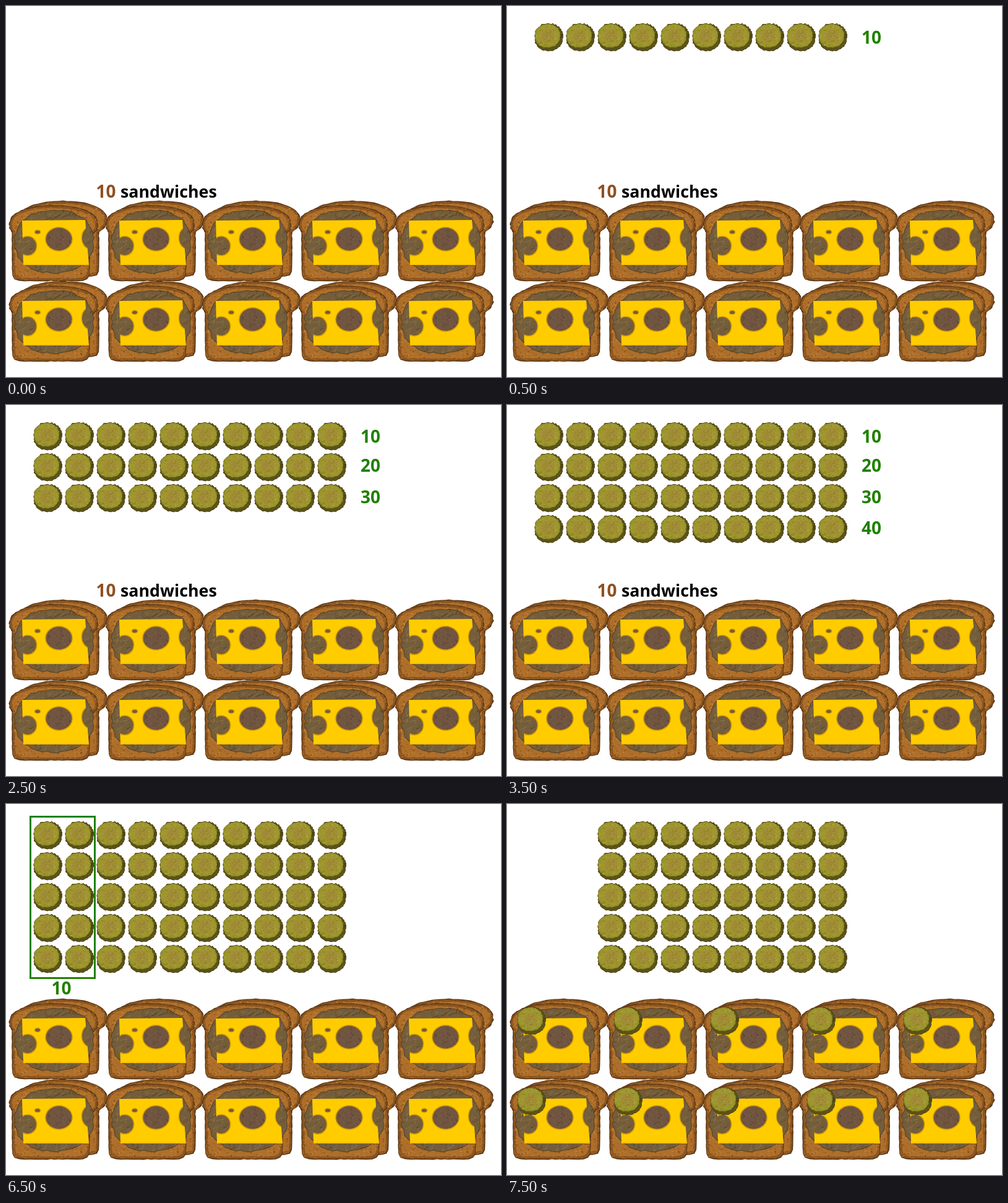
An HTML page with a canvas for the animation above (8 s loop, 800 px wide and 600 px high).

```html
<!DOCTYPE html>
<html lang="en">
<head>
<meta charset="utf-8">
<title>Pickles and sandwiches</title>
<style>
  html, body { margin: 0; width: 100%; height: 100%; overflow: hidden; background: #fff; }
  canvas, svg { position: absolute; left: 0; top: 0; width: 800px; height: 600px; }
  text { font: bold 26.8px "Noto Sans", "Open Sans", sans-serif; }
  .num { font-size: 28px; fill: #208000; }
  .brown { fill: #8f5020; }
</style>
</head>
<body>
<canvas id="stage" width="800" height="600"></canvas>
<svg viewBox="0 0 800 600">
  <g data-from="0" data-to="5">
    <text class="num brown" x="145.5" y="310">10</text>
    <text x="185" y="310">sandwiches</text>
  </g>
  <text class="num" data-from="1" data-to="5" x="573" y="61">10</text>
  <text class="num" data-from="2" data-to="5" x="573" y="108">20</text>
  <text class="num" data-from="3" data-to="5" x="573" y="159">30</text>
  <text class="num" data-from="4" data-to="5" x="573" y="209">40</text>
  <g data-from="5" data-to="5">
    <text class="num" x="573" y="260">50</text>
    <text x="620" y="259">pickles</text>
  </g>
  <g data-from="6" data-to="6">
    <rect x="39.5" y="20.5" width="104" height="261" fill="none" stroke="#208000" stroke-width="3"/>
    <text class="num" x="73.5" y="308">10</text>
  </g>
</svg>
<script>
const LOOP = 8000;
const STEPS = [0, 500, 1500, 2500, 3500, 4500, 6500, 7500];
const GAP = 156;

let seed = 7;
function rnd(a = 0, b = 1) {
  seed = (seed * 16807) % 2147483647;
  return a + (b - a) * seed / 2147483647;
}

function sprite(w, h, draw) {
  const c = document.createElement('canvas');
  c.width = w;
  c.height = h;
  draw(c.getContext('2d'));
  return c;
}

// Superellipse with a ragged edge: power 2 is round, higher is squarer
function rough(cx, cy, rx, ry, power, jag, path = new Path2D()) {
  const n = 64;
  for (let i = 0; i < n; i++) {
    const a = i / n * Math.PI * 2, c = Math.cos(a), s = Math.sin(a);
    const r = (Math.abs(c) ** power + Math.abs(s) ** power) ** (-1 / power) + rnd(-jag, jag);
    path[i ? 'lineTo' : 'moveTo'](cx + rx * r * c, cy + ry * r * s);
  }
  path.closePath();
  return path;
}

// Random short strokes spread over a w by h area
function grain(g, w, h, count, colors, len, alpha, angle) {
  g.globalAlpha = alpha;
  for (let i = 0; i < count; i++) {
    const x = rnd(0, w), y = rnd(0, h);
    const a = angle + rnd(-0.7, 0.7), l = rnd(0.5, len);
    g.strokeStyle = colors[Math.floor(rnd(0, colors.length))];
    g.lineWidth = rnd(0.7, 2.2);
    g.beginPath();
    g.moveTo(x, y);
    g.lineTo(x + Math.cos(a) * l, y + Math.sin(a) * l);
    g.stroke();
  }
  g.globalAlpha = 1;
}

// Domed crust over a square body
function loaf(inset) {
  const path = rough(77, 43, 72 - inset, 31 - inset, 2.2, 0.015);
  return rough(72.5, 88, 63 - inset, 47 - inset, 11, 0.01, path);
}

function slice(g, dx, dy) {
  g.save();
  g.translate(dx, dy);
  g.fillStyle = '#5a3716';
  g.fill(loaf(0));
  g.fillStyle = '#8b5420';
  g.fill(loaf(1.5));
  g.clip(loaf(1));
  g.fillStyle = '#ae6f2b';
  g.fill(loaf(5));
  grain(g, 155, 140, 1300, ['#6b3d12', '#8a5518', '#d09343', '#c4812f', '#b4722a'], 4, 0.6, 0.4);
  g.restore();
}

const bread = sprite(170, 140, g => {
  slice(g, 15, -7);
  slice(g, 0, 0);
});

const cheese = sprite(170, 140, g => {
  const slab = new Path2D('M26 37 L128 36 L134 109 L28 109 Z');
  g.fillStyle = '#ffcc00';
  g.fill(slab);
  g.fillStyle = '#f6c000';
  g.fillRect(28, 107, 106, 2);

  function hole(x, y, rx, ry) {
    g.beginPath();
    g.ellipse(x, y, rx, ry, 0, 0, Math.PI * 2);
    g.globalCompositeOperation = 'source-atop';
    g.lineWidth = 3;
    g.strokeStyle = '#d9a200';
    g.stroke();
    g.globalCompositeOperation = 'destination-out';
    g.fill();
  }
  hole(85.5, 67, 21, 18.5);
  hole(51, 55.5, 4, 2.6);
  hole(35, 78, 14, 15);
  hole(136, 65, 13, 17);
});

const filling = sprite(170, 140, g => {
  const meat = rough(78, 71, 64, 51, 2.3, 0.025);
  g.save();
  g.clip(meat);
  g.fillStyle = '#745d3b';
  g.fillRect(0, 0, 170, 140);
  grain(g, 160, 130, 420, ['#4c3a1e', '#87704a', '#91794f', '#665030'], 13, 0.55, 2.3);
  g.lineWidth = 2;
  g.strokeStyle = 'rgba(64,48,22,.6)';
  g.stroke(meat);

  g.clip(rough(85.5, 67, 23, 21, 2, 0));
  g.fillStyle = '#705541';
  g.fillRect(60, 40, 50, 50);
  grain(g, 150, 100, 700, ['#553d2b', '#86694f', '#65432e'], 5, 0.5, 0.8);
  g.restore();
  g.drawImage(cheese, 0, 0);
});

const pickle = sprite(51, 49, g => {
  const rind = rough(24.5, 23.5, 23, 22.5, 2.2, 0.045);
  g.clip(rind);
  g.fillStyle = '#5a5317';
  g.fillRect(0, 0, 51, 49);
  grain(g, 50, 48, 90, ['#3b2e12', '#757019', '#58601a'], 5, 0.6, 0.9);
  g.lineWidth = 2;
  g.strokeStyle = '#54451f';
  g.stroke(rind);

  g.clip(rough(22.5, 21, 20.5, 19, 2.2, 0.04));
  const fill = g.createRadialGradient(23, 21, 4, 23, 21, 23);
  fill.addColorStop(0, '#a18a37');
  fill.addColorStop(0.6, '#9f972f');
  fill.addColorStop(1, '#8d8824');
  g.fillStyle = fill;
  g.fillRect(0, 0, 51, 49);
  grain(g, 46, 42, 130, ['#777519', '#b9b047', '#a29b35'], 5, 0.45, 0.3);
  g.clip(rough(23, 21, 11, 9, 2, 0.1));
  grain(g, 46, 42, 110, ['#8d6929', '#b08c3d', '#7f7122'], 6, 0.4, 2.2);
});

const pen = document.getElementById('stage').getContext('2d');
const parts = document.querySelectorAll('[data-from]');

function show(step) {
  const moved = step === 7;
  pen.clearRect(0, 0, 800, 600);
  for (const y of [310, 440]) {
    for (let i = 0; i < 5; i++) {
      pen.drawImage(bread, i * GAP, y);
      pen.drawImage(filling, i * GAP + (i ? 1 : 0), y);
      if (moved) pen.drawImage(pickle, 15 + i * GAP, y + 17);
    }
  }
  for (let row = 0; row < Math.min(step, 5); row++) {
    for (let col = moved ? 2 : 0; col < 10; col++) {
      pen.drawImage(pickle, Math.round(42.5 + col * 51.1), 27 + row * 50);
    }
  }
  for (const el of parts) {
    const on = step >= +el.dataset.from && step <= +el.dataset.to;
    el.style.visibility = on ? 'visible' : 'hidden';
  }
}

const start = performance.now();
let current = -1;

function tick() {
  const t = (performance.now() - start) % LOOP;
  const step = STEPS.filter(s => s <= t).length - 1;
  if (step !== current) show(current = step);
  requestAnimationFrame(tick);
}
tick();
</script>
</body>
</html>
```
